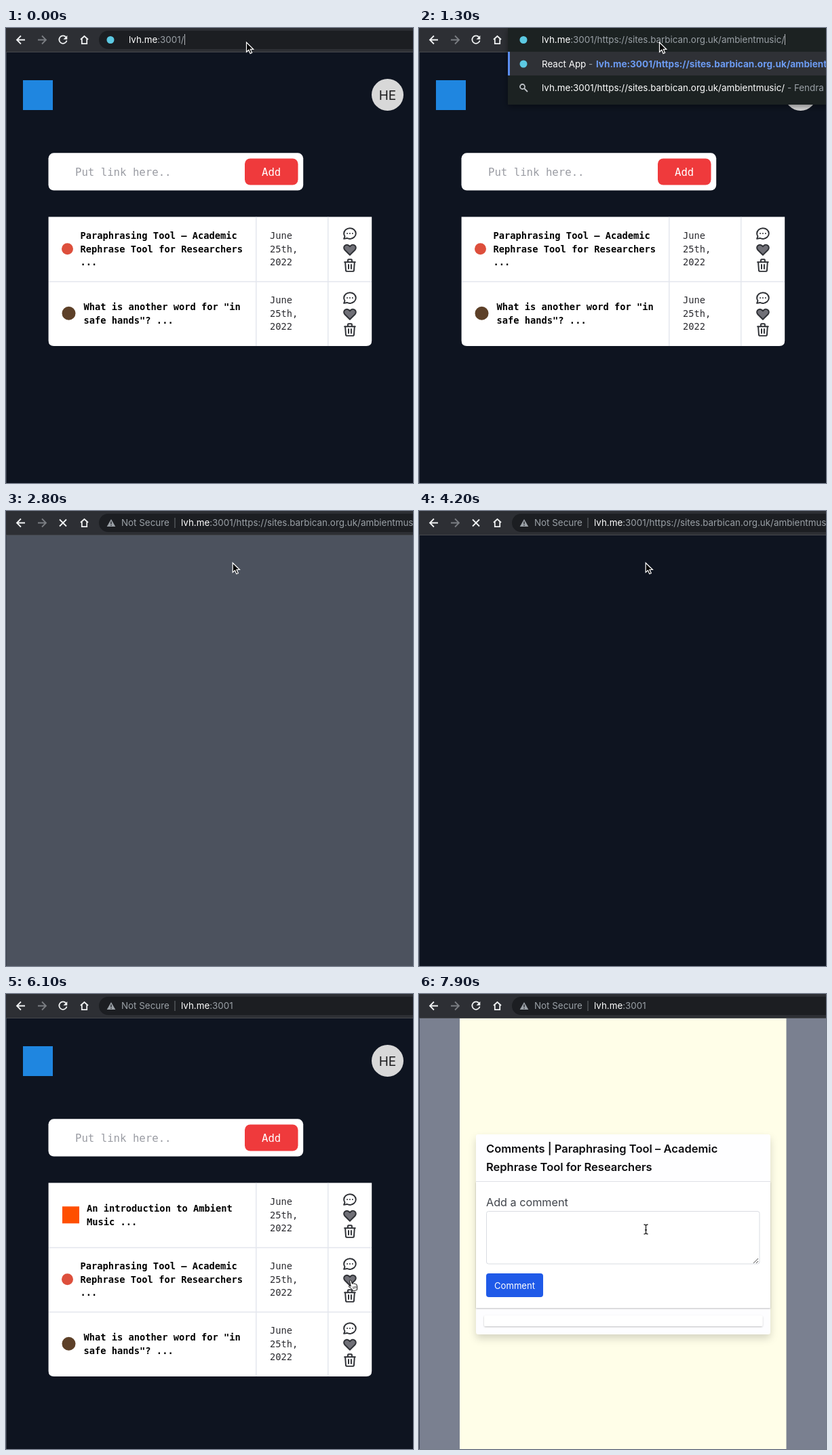
Animation of 600 by 671 pixels, one loop 8000 ms. Source, as an HTML page:

```html
<!DOCTYPE html>
<html lang="en">
<head>
<meta charset="utf-8">
<title>Bookmarks</title>
<style>
html, body { margin: 0; width: 100%; height: 100%; overflow: hidden; background: #0e1420; }
svg { display: block; width: 600px; height: 671px; }
text { white-space: pre; }
.ui { font: 13.4px Inter, sans-serif; fill: #9aa0a6; }
.ui .hi { fill: #fff; }
.ui .link { fill: #6c9bf2; font-weight: 700; font-size: 13.6px; }
.mono { font: 13.72px "DejaVu Sans Mono", monospace; fill: #2b2b30; }
.title { font-weight: 700; fill: #000; }
.big { font-size: 15.68px; }
.modal { font: 16.2px Inter, sans-serif; fill: #3f434a; }
.line { fill: none; stroke-width: 1.8; }
.icon { fill: none; stroke: #2f3136; stroke-width: 2; stroke-linecap: round; stroke-linejoin: round; }
</style>
</head>
<body>
<svg id="stage" viewBox="0 0 600 671"></svg>
<script>
const LOOP = 8000, STEP = 100;
const PASTE = 200, ENTER = 1500, UNLOAD = 2800, DARK = 2900, SHOWN = 4500,
      ICONS = 4600, LOADED = 5000, ADDED = 5300, MODAL = 7400;

// A group visible only inside the given [from, to) spans.
const during = (spans, body) =>
  `<g data-on='${JSON.stringify(spans)}'>${body}</g>`;
const rect = (x, y, w, h, fill, r = 0, more = '') =>
  `<rect x="${x}" y="${y}" width="${w}" height="${h}" rx="${r}" fill="${fill}" ${more}/>`;
const circle = (x, y, r, fill) => `<circle cx="${x}" cy="${y}" r="${r}" fill="${fill}"/>`;
const text = (x, y, cls, body, more = '') =>
  `<text x="${x}" y="${y}" class="${cls}" ${more}>${body}</text>`;
const line = (d, stroke, more = '') =>
  `<path d="${d}" class="line" stroke="${stroke}" ${more}/>`;

const path = '/https://sites.barbican.org.uk/ambientmusic/';
const url = rest => `<tspan class="hi">lvh.me</tspan>:3001${rest}`;
const cyanDot = y => circle(154, y, 5.5, '#5cc9e2');
const caret = x => rect(x, 9, 1, 16, '#b4b6ba');

function toolbar() {
  const secure = rest =>
    '<path d="M155 12l6.3 11h-12.6z" fill="#9aa0a6"/>' +
    '<path d="M155 15.5v4m0 1.2v1.2" stroke="#1c1e22" stroke-width="1.3"/>' +
    text(170, 22, 'ui', 'Not Secure') + rect(248.5, 10, 1, 15, '#6b6f75') +
    text(258, 22, 'ui', url(rest), 'font-weight="500"');
  return rect(0, 0, 600, 35, '#2d2f34') + rect(0, 35, 600, 1, '#44474c') +
    rect(137, 4, 500, 27, '#1c1e22', 13.5) +
    line('M28 17.5H16m6-6l-6 6 6 6', '#f1f3f4') +
    line('M47 17.5h12m-6-6l6 6-6 6', '#7b7e83') +
    line('M110 17l5.5-5 5.5 5M111.8 16v7.2h7.4V16', '#f1f3f4') +
    during([[0, ENTER], [LOADED, LOOP]],
      line('M88.5 13.5A5.7 5.7 0 1 0 89.6 18.5', '#f1f3f4') +
      '<path d="M90.3 11v5.8h-5.8z" fill="#f1f3f4"/>') +
    during([[ENTER, LOADED]], line('M79 12.5l10 10m0-10l-10 10', '#f1f3f4')) +
    during([[0, PASTE]], cyanDot(17.5) + text(181, 22, 'ui', url('/')) + caret(263)) +
    during([[ENTER, SHOWN]], secure(path)) +
    during([[SHOWN, LOOP]], secure(''));
}

function suggestions() {
  return rect(131, 0, 500, 113, '#1f2124', 0, 'filter="url(#drop)"') +
    rect(131, 35, 469, 35, '#2f3136') +
    rect(131, 35, 3, 35, '#5b8def') + cyanDot(17.5) + cyanDot(53) +
    text(181, 22, 'ui', url(path)) + caret(539) +
    text(181, 57.5, 'ui', '<tspan class="hi">React App</tspan> - ') +
    text(261, 57.5, 'ui', `<tspan class="link">lvh.me:3001${path}</tspan>`) +
    '<circle cx="152.5" cy="86.5" r="3.5" class="line" stroke="#bdc1c6"/>' +
    line('M155 89l5 5', '#bdc1c6') +
    text(181, 93, 'ui', `<tspan class="hi">lvh.me:3001${path}</tspan>`) +
    text(543, 93, 'ui', '- Fendra Search');
}

// Icons drawn on a 24-unit grid.
const icons = [
  ['M8 12h.01M12 12h.01M16 12h.01M21 12c0 4.418-4.03 8-9 8a9.863 9.863 0 01-4.255-.949L3 20l1.395-3.72C3.512 15.042 3 13.574 3 12c0-4.418 4.03-8 9-8s9 3.582 9 8z', 'none'],
  ['M4.318 6.318a4.5 4.5 0 000 6.364L12 20.364l7.682-7.682a4.5 4.5 0 00-6.364-6.364L12 7.636l-1.318-1.318a4.5 4.5 0 00-6.364 0z', '#707077'],
  ['M19 7l-.867 12.142A2 2 0 0116.138 21H7.862a2 2 0 01-1.995-1.858L5 7m5 4v6m4-6v6m1-10V4a1 1 0 00-1-1h-4a1 1 0 00-1 1v3M4 7h16', 'none']
];

// One table row, drawn with its top at 0.
function row(x, lines, mark) {
  const first = 52 - 9.8 * (lines.length - 1);
  return rect(368, 0, 1.5, 95, '#e4e7ee') + rect(474, 0, 1.5, 95, '#e4e7ee') +
    mark +
    lines.map((s, i) => text(x, first + 19.6 * i, 'mono title', s)).join('') +
    ['June', '25th,', '2022'].map((s, i) => text(389, 32.4 + 19.6 * i, 'mono', s)).join('') +
    icons.map(([d, fill], i) =>
      `<path d="${d}" class="icon" style="fill:${fill}" transform="translate(495.2 ${12.5 + 23.5 * i}) scale(.98)"/>`).join('');
}

const lazyMark = (x, w, mark) =>
  during([[SHOWN, ICONS]], rect(x, 32, w, 31, 'none', 7, 'stroke="#f5f5f8" stroke-width="2"')) +
  during([[0, UNLOAD], [ICONS, LOOP]], mark);

function page() {
  const rule = y => rect(63, y, 476, 1.5, '#e4e7ee');
  return rect(25, 77, 44, 44, '#1f86e0') +
    circle(562.5, 98.5, 23.5, '#d8d8d8') +
    text(562.5, 105.5, 'modal', 'HE', 'text-anchor="middle" style="font-size:19px;fill:#1c1c1e"') +
    rect(62.5, 184.3, 375.7, 55.2, '#fff', 8) +
    text(102, 217.5, 'mono big', 'Put link here..', 'style="fill:#9a9ca3"') +
    rect(352, 192.5, 78.5, 39, '#ef3a3c', 8) +
    during([[0, UNLOAD], [ADDED, LOOP]], text(377, 217.5, 'mono big', 'Add', 'style="fill:#fff"')) +
    during([[SHOWN, ADDED]], text(377, 217.5, 'mono big', '...', 'style="fill:#fff"')) +
    '<path id="table" fill="#fff"/>' +
    during([[ADDED, LOOP]], '<g transform="translate(0 278.8)">' +
      row(119, ['An introduction to Ambient', 'Music ...'], rect(83, 34.5, 25, 25, '#ff4f00')) +
      '</g>' + rule(468.3)) +
    '<g id="rows">' +
    row(109.5, ['Paraphrasing Tool – Academic', 'Rephrase Tool for Researchers', '...'],
      lazyMark(84, 14, circle(90.5, 47, 8.5, '#dd4f3c'))) +
    '<g transform="translate(0 95)">' +
    row(114.5, ['What is another word for "in', 'safe hands"? ...'],
      lazyMark(84, 18, circle(92.5, 47, 10, '#5d4028'))) +
    '</g></g>' + rule(373.3);
}

function modal() {
  return rect(0, 36, 600, 635, '#7a8090') + rect(60, 36, 481.5, 635, '#fffee8') +
    rect(84, 207, 434, 295, '#fdfdff', 4, 'filter="url(#shadow)"') +
    rect(84, 277, 434, 186, '#fff', 0, 'filter="url(#thin)"') +
    rect(84, 207, 434, 70, '#fefeff', 4) + rect(84, 276, 434, 1, '#dfe1e6') +
    ['Comments | Paraphrasing Tool – Academic', 'Rephrase Tool for Researchers'].map((s, i) =>
      text(99, 234 + 27.4 * i, 'modal', s, 'style="font-size:16.5px;font-weight:600;fill:#0c0c0f"')).join('') +
    text(99, 313, 'modal', 'Add a comment') +
    rect(99.5, 320.5, 402.5, 77.5, '#fff', 3, 'stroke="#d9dce2"') +
    '<path d="M493 397l7-7m-3 7l3-3" stroke="#555" stroke-width="1"/>' +
    rect(99, 412, 84, 35, '#1f5ae8', 4) +
    text(111, 434.5, 'modal', 'Comment', 'style="font-size:13.1px;fill:#fff"') +
    rect(96, 474, 410.5, 16, '#fff', 2, 'filter="url(#thin)"');
}

const pointers = {
  arrow: '<path d="M0 0v14l3.3-3 2.3 5.3 2.5-1.1-2.3-5.2h4.4z" fill="#000" stroke="#fff" stroke-width="1.2"/>',
  hand: '<path d="M1.5.8q1.5-1.3 2.5.7l1.3 4.5 1-.8 1.4.6 1.3-.3 1.2.9 1.5.1 1.2 4-.5 4.5-5.5 1.5-2.7-3.7-3.8-2.5q-.2-1.8 1.7-1.3l1.2.8z" fill="#fff" stroke="#111" stroke-width="1"/>' +
    '<path d="M6.5 10l.8 3.5m1.3-4l.8 3.5m1.2-4l.7 3.3" stroke="#111" stroke-width=".8"/>',
  beam: line('M-3-7q3 0 3 2 0-2 3-2M0-5V5m-3 2q3 0 3-2 0 2 3 2M-1.5 1h3', '#222', 'style="stroke-width:1.3"')
};

const filter = (id, dy, blur, alpha) =>
  `<filter id="${id}" x="-10%" y="-20%" width="120%" height="150%"><feDropShadow dx="0" dy="${dy}" stdDeviation="${blur}" flood-opacity="${alpha}"/></filter>`;

const stage = document.getElementById('stage');
stage.innerHTML = `<defs>${filter('shadow', 6, 6, .16)}${filter('thin', 1, 1.2, .25)}${filter('drop', 3, 5, .4)}</defs>` +
  rect(0, 0, 600, 671, '#0e1420') +
  during([[0, UNLOAD], [SHOWN, LOOP]], page()) +
  during([[UNLOAD, DARK]], rect(0, 36, 600, 635, '#4c525e')) +
  during([[3300, 3800]], '<circle cx="300.5" cy="354" r="17" class="line" stroke="#8b909b" stroke-width="3" stroke-dasharray="78 29" id="spinner"/>') +
  `<g id="modal">${modal()}</g>` +
  rect(0, 36, 1, 635, '#3b414d') + toolbar() +
  during([[PASTE, ENTER]], suggestions()) +
  '<g id="pointer"></g>';

const $ = id => document.getElementById(id);
const timed = [...stage.querySelectorAll('[data-on]')]
  .map(el => ({ el, spans: JSON.parse(el.dataset.on) }));

// Pointer stops: time, x, y.
const stops = [
  [0, 354.5, 21.3], [1500, 354.5, 21.3], [2000, 334.2, 76.5], [4400, 334.2, 76.5],
  [4500, 332.7, 79.5], [4900, 332.7, 79.5], [5900, 505, 418], [6100, 505, 421.5],
  [6300, 505, 421.5], [7000, 503, 397], [7400, 503, 397], [7800, 334.5, 347], [8000, 334.5, 347]
];
const ease = p => p * p * (3 - 2 * p);

function pointerAt(t) {
  const i = stops.findIndex(s => s[0] > t);
  const [a, ax, ay] = stops[i - 1], [b, bx, by] = stops[i];
  const p = ease((t - a) / (b - a));
  return [ax + (bx - ax) * p, ay + (by - ay) * p];
}

let shape;
function draw(now) {
  const t = Math.floor(now % LOOP / STEP) * STEP;
  for (const { el, spans } of timed)
    el.style.display = spans.some(([a, b]) => t >= a && t < b) ? '' : 'none';

  const added = t >= ADDED;
  $('table').setAttribute('d', `M62.6 278.6h476.6v${added ? 277.5 : 182.5}q0 8-8 8h-460.6q-8 0-8-8z`);
  $('rows').setAttribute('transform', `translate(0 ${added ? 373.8 : 278.8})`);
  $('spinner').setAttribute('transform', `rotate(${t * .36} 300.5 354)`);
  $('modal').style.opacity = Math.max(0, Math.min(1, (t - MODAL + STEP) / 300));

  const next = t >= 7700 ? 'beam' : t >= 5900 && t < MODAL ? 'hand' : 'arrow';
  if (next !== shape) $('pointer').innerHTML = pointers[shape = next];
  $('pointer').setAttribute('transform', `translate(${pointerAt(t)})`);
  requestAnimationFrame(draw);
}
draw(performance.now());
</script>
</body>
</html>
```
